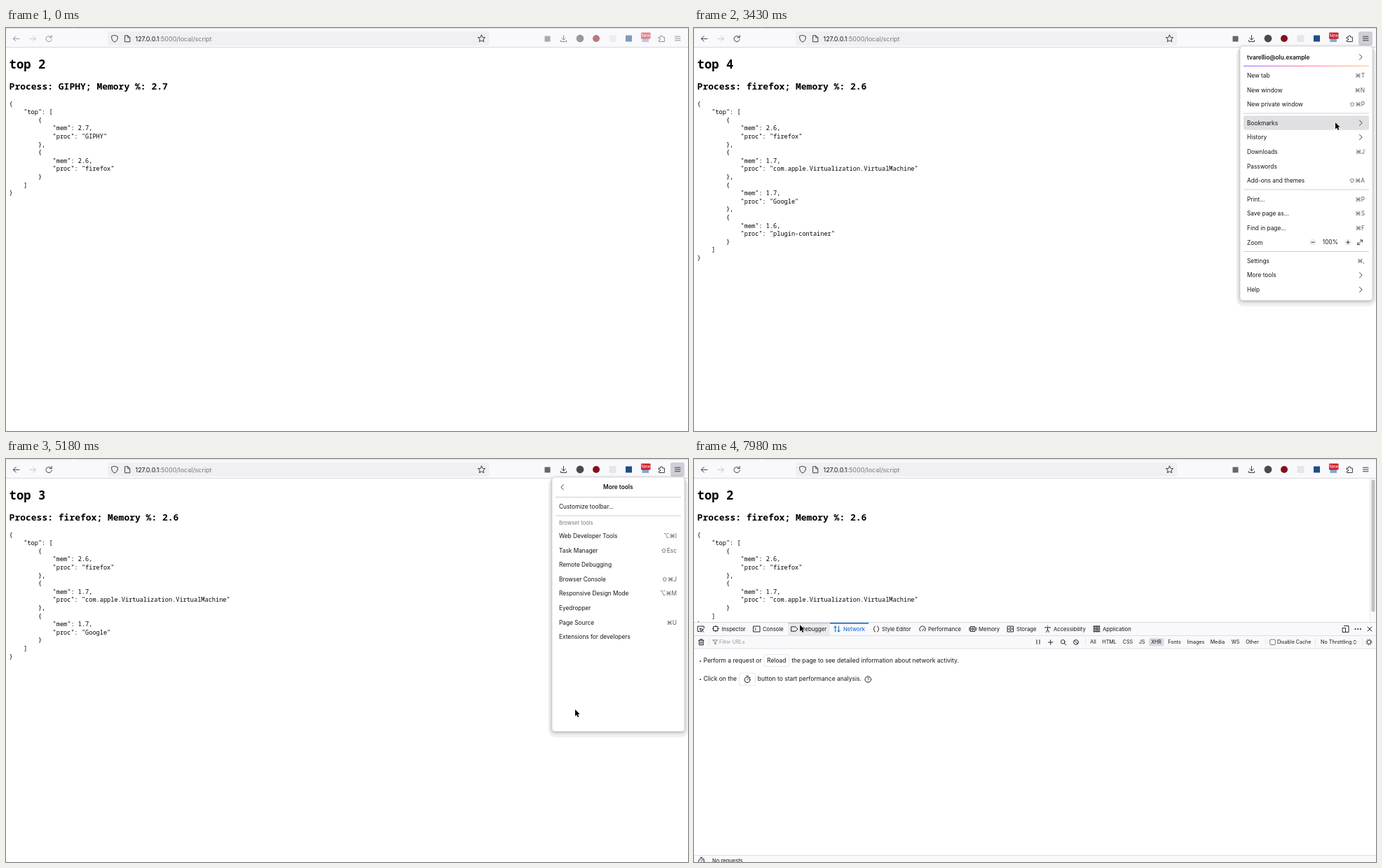
An HTML page that plays this animation: 973 by 576 pixels, repeating every 8000 ms.

```html
<!DOCTYPE html>
<html lang="en">
<head>
<meta charset="utf-8">
<title>Process memory page</title>
<style>
html, body { margin: 0; width: 100%; height: 100%; overflow: hidden; background: #fff; }
svg { display: block; width: 973px; height: 576px; }
text { font-family: Inter, "DejaVu Sans", sans-serif; fill: #15141a; white-space: pre; }
.mono text { font-family: "Roboto Mono", "Noto Sans Mono", "DejaVu Sans Mono", monospace; fill: #000; }
.bold { font-weight: 600; }
.key { fill: #5b5b66; }
.line { fill: none; stroke: #3a3942; stroke-width: 1; stroke-linecap: round; stroke-linejoin: round; }
.soft { stroke: #c4c4ca; }
.blue { stroke: #0060df; }
#devtools .line:not(.blue) { stroke: #25242c; }
</style>
</head>
<body>
<svg id="stage" viewBox="0 0 973 576" xmlns="http://www.w3.org/2000/svg"></svg>
<script>
const LOOP = 8000, TICK = 70;
const MENU = { x: 779, y: 26, w: 189, h: 363.5 };
const ROW = 20.6;
const BAR = '#f9f9fb';

// Drawing helpers
const text = (x, y, s, size = 8.3, attrs = '') =>
  `<text x="${x}" y="${y}" font-size="${size}" ${attrs}>${s}</text>`;
const rect = (x, y, w, h, fill, attrs = '') =>
  `<rect x="${x}" y="${y}" width="${w}" height="${h}" fill="${fill}" ${attrs}/>`;
const path = (d, cls = '', attrs = '') => `<path class="line ${cls}" d="${d}" ${attrs}/>`;
const dot = (x, y, r, fill) => `<circle cx="${x}" cy="${y}" r="${r}" fill="${fill}"/>`;
const ring = (x, y, r, attrs = '') => `<circle class="line" cx="${x}" cy="${y}" r="${r}" ${attrs}/>`;
const group = (id, body, attrs = '') => `<g id="${id}" ${attrs}>${body}</g>`;
const END = 'text-anchor="end"', MID = 'text-anchor="middle"';

const chevron = (x, y, dir = 1) =>
  path(`M${x - 2 * dir} ${y - 3.6}l${3.7 * dir} 3.6l${-3.7 * dir} 3.6`, '', 'stroke-width=".8"');
const rule = y => rect(784, y - .5, 179, 1, '#cfcfd3');
const stopwatch = (x, y) => ring(x, y + .6, 3.9) +
  path(`M${x - 1.2} ${y - 5}h2.4M${x} ${y + .6}l1.6-1.7M${x + 3} ${y - 3.4}l1 1`);

function toolbar() {
  const base = rect(0, 0, 973, 28, BAR) + rect(0, 0, 973, 1, '#dedee2') +
    rect(95, 0, 2, 1, '#fff') + rect(0, 27, 973, 1, '#d9d9dd') +
    rect(145, 5, 544, 20, '#f0f0f4', 'rx="3"');
  const address =
    path('M155 10.4l4.4 1.6c.2 4-1.2 6.6-4.4 8.2c-3.2-1.6-4.6-4.2-4.4-8.2Z') +
    path('M170 10.8h4l2.8 2.8v6.2h-6.8ZM173.8 11v2.8h2.8') +
    path('M678.5 10l1.5 3.3l3.6.4l-2.7 2.4l.8 3.6l-3.2-1.8l-3.2 1.8l.8-3.6l-2.7-2.4l3.6-.4Z', '', 'stroke-width=".9"') +
    text(184.5, 18.5, '127.0.0.1<tspan fill="#77767e">:5000/local/script</tspan>', 8.95);
  const nav =
    path('M19 15.3h-8.5M14.2 11.5l-3.8 3.8l3.8 3.8') +
    path('M64.4 13a4.1 4.1 0 1 0 .8 3.3M65.2 10.5v3.2h-3.2');
  const tools =
    rect(768.5, 11.5, 8, 8, '#67666f') +
    path('M795.5 10.5v6.3M792.6 14.2l2.9 2.8l2.9-2.8M791.5 17.5v2h8v-2') +
    dot(819, 15, 5.4, '#4a4952') +
    dot(842, 15, 5, '#85101b') +
    rect(860.5, 10, 10, 10, '#e6e6e9') +
    rect(884, 10.5, 9, 9, '#1d4f86') +
    rect(907.5, 12, 9.5, 8, '#7fa9d2') +
    rect(906, 6.5, 13.5, 9, '#d01c28', 'rx="1"') +
    text(912.8, 13.3, 'New', 6, `${MID} style="fill:#fff"`) +
    path('M931.5 13h2.3v-.9a1.4 1.4 0 0 1 2.8 0v.9h2.8v6.5h-7.9v-2.2h1a1.2 1.2 0 0 0 0-2.4h-1Z') +
    path('M954.5 12.2h7.5M954.5 15h7.5M954.5 17.8h7.5');
  return base + address + rect(948, 5, 20, 20, '#cfcfd8', 'id="burger" rx="3"') +
    path('M33.8 15.3h8.5M38.6 11.5l3.8 3.8l-3.8 3.8', 'soft') +
    group('chrome', nav + tools);
}

// Menu rows: centre y, label, shortcut (">" marks a submenu)
const mainRows = [
  [68, 'New tab', '⌘T'], [88.7, 'New window', '⌘N'], [109.3, 'New private window', '⇧⌘P'],
  [135.5, 'Bookmarks', '>'], [156, 'History', '>'], [176.8, 'Downloads', '⌘J'],
  [197.5, 'Passwords', ''], [218, 'Add-ons and themes', '⇧⌘A'],
  [244.5, 'Print...', '⌘P'], [265.2, 'Save page as...', '⌘S'], [285.8, 'Find in page...', '⌘F'],
  [332.8, 'Settings', '⌘,'], [353.3, 'More tools', '>'], [374, 'Help', '>']
];
const subRows = [
  [68, 'Customize toolbar...', ''], ...[
    ['Web Developer Tools', '⌥⌘I'], ['Task Manager', '⇧Esc'], ['Remote Debugging', ''],
    ['Browser Console', '⇧⌘J'], ['Responsive Design Mode', '⌥⌘M'], ['Eyedropper', ''],
    ['Page Source', '⌘U'], ['Extensions for developers', '']
  ].map(([label, key], i) => [110 + i * ROW, label, key])
];
const rowsMarkup = rows => rows.map(([y, label, key]) =>
  text(789, y + 3, label) +
  (key === '>' ? chevron(951.5, y) : text(957, y + 3, key, 8.3, `${END} class="key"`))).join('');
const hoverBar = id => rect(784, 0, 179, ROW, '#e0e0e2', `id="${id}" rx="2"`);

function menu() {
  const { x, y, w, h } = MENU;
  const main = hoverBar('mainHover') +
    text(789, 44.5, 'tvarellio@olu.example', 8.3, 'class="bold"') + chevron(951.5, 41.5) +
    rect(784, 53.8, 179, 1, 'url(#rainbow)') + [122, 231, 319.5].map(rule).join('') +
    rowsMarkup(mainRows) + text(789, 309.5, 'Zoom') +
    dot(883, 306.3, 5, '#f0f0f4') + dot(933, 306.3, 5, '#f0f0f4') +
    path('M880.8 306.3h4.4M930.8 306.3h4.4M933 304.1v4.4') +
    text(907.8, 309.4, '100%', 8.3, MID) +
    path('M947 309.4l6.2-6.2M950.4 303h3v3M949.8 309.6h-3v-3');
  const sub = hoverBar('subHover') + chevron(793.5, 40.3, -1) +
    text(873.3, 43.3, 'More tools', 8.3, `${MID} class="bold"`) + rule(54.5) + rule(81) +
    text(789, 93.7, 'Browser tools', 7.5, 'style="fill:#77767e"') + rowsMarkup(subRows);
  return rect(774, 28, 199, 370, '#000', 'rx="10" opacity=".055"') +
    rect(x, y, w, h, '#fff', 'rx="4" stroke="#c9c9ce" stroke-width=".6" style="filter:drop-shadow(0 1px 2px rgba(0,0,0,.3))"') +
    `<g clip-path="url(#panel)">${group('main', main)}${group('sub', sub)}</g>`;
}

const page = group('page',
  text(4.6, 58, '', 17.24, 'id="title" font-weight="700"') +
  text(4.6, 88.4, '', 13, 'id="lead" font-weight="700"') +
  group('json', ''), 'class="mono"');

// Developer tool tabs: label x, label, icon path
const tabs = [
  [39.5, 'Inspector', 'M28 239.5h6v6h-6ZM31 238v1.5M31 245.5v1.5M26.5 242.5h1.5M34 242.5h1.5'],
  [98, 'Console', 'M85 239h9v8h-9ZM87 241.5l1.6 1.5l-1.6 1.5'],
  [153, 'Debugger', 'M139 239.8h6l3 3.2l-3 3.2h-6Z'],
  [213, 'Network', 'M201.5 247v-8M199.5 241l2-2l2 2M206.5 239v8M204.5 245l2 2l2-2'],
  [268, 'Style Editor', 'M258.5 239c-2 0-1 3.5-2.5 4c1.5.5.5 4 2.5 4M261.5 239c2 0 1 3.5 2.5 4c-1.5.5-.5 4-2.5 4'],
  [334, 'Performance', 'M322.8 246a4.3 4.3 0 1 1 6.5 0M326 245.5l1.8-3'],
  [406, 'Memory', 'M394.7 239.5h6v7h-6ZM396.7 241.5h2v3h-2ZM393 241v4M402.4 241v4'],
  [460, 'Storage', 'M447.5 239h8v8h-8ZM447.5 243h8M450.5 241h2M450.5 245h2'],
  [513, 'Accessibility', 'M500.5 240.8h8M504.5 241v3l-2 3.5M504.5 244l2 3.5M504.5 238.4v.3'],
  [583, 'Application', '']
];
const filters = [[569.5, 'All'], [592.5, 'HTML'], [619, 'CSS'], [639, 'JS'], [659.5, 'XHR'],
  [685.5, 'Fonts'], [716, 'Images'], [747, 'Media'], [772.5, 'WS'], [796.5, 'Other']];

function devtools() {
  const grid = [0, 1, 2].flatMap(i => [0, 1, 2].map(j =>
    `<rect class="line" x="${570.5 + i * 3.3}" y="${238.7 + j * 3.3}" width="1.7" height="1.7" stroke-width=".7"/>`)).join('');
  const tabBar = rect(0, 233, 973, 1, '#d9d9dd') + rect(0, 234, 973, 37, BAR) +
    rect(0, 252, 973, 1, '#dfdfe3') + rect(0, 270.5, 973, 1, '#dfdfe3') +
    group('tabHover', rect(134, 234, 59.5, 18, '#ebebee') + rect(134, 234, 59.5, 1.3, '#c6c6cb')) +
    rect(194, 234, 55, 1.5, '#0060df') +
    path('M8 246.5h-2.8v-7.5h9v3M8.5 242l5 1.8l-2.2 1l-1 2.2ZM11.5 245l2.3 2.3') +
    tabs.map(([x, label, d]) => path(d, label === 'Network' ? 'blue' : '') +
      text(x, 245.6, label, 7.7, label === 'Network' ? 'style="fill:#0060df"' : '')).join('') + grid +
    path('M927.5 238.5h6.5v9h-3.5M925.5 241.5h4v6h-4Z') +
    [943.5, 947.2, 950.9].map(x => dot(x, 243, 1.1, '#2b2a33')).join('') +
    path('M961 240l6 6M967 240l-6 6');
  const divider = x => rect(x, 256, .8, 11, '#e0e0e4');
  const filterBar = [21, 558, 815, 886, 953].map(divider).join('') +
    path('M6.5 259.2h7.5M8.8 259v-1.3h3v1.3M7.3 259.5v6.3h6v-6.3M9.3 261.3v2.7M11.3 261.3v2.7') +
    path('M27 258.8h6.5l-2.5 3v3.2l-1.5-1v-2.2Z', '', 'style="stroke:#85848c" stroke-width=".8"') +
    text(36, 264.3, 'Filter URLs', 7.1, 'style="fill:#96959d"') +
    path('M489 258.5v6M493 258.5v6M505.5 262h6.5M508.7 258.7v6.5M528.3 263.3l2.5 2.5M542.7 259.5l4.7 4.7') +
    ring(526.3, 261.2, 2.8) + ring(545, 261.9, 3.4) +
    rect(649, 256, 21.5, 11.5, '#dddde1', 'rx="1.5"') +
    filters.map(([x, s]) => text(x, 264.3, s, 7.1, MID)).join('') +
    rect(821.8, 258, 7.5, 7.5, '#fff', 'stroke="#55545c" stroke-width=".8" rx="1"') +
    text(832, 264.3, 'Disable Cache', 7.1) + text(894, 264, 'No Throttling', 7.2) +
    path('M941 260.8l1.7-1.8l1.7 1.8M941 262.8l1.7 1.8l1.7-1.8', '', 'stroke-width=".8"') +
    ring(963, 261.7, 2.8, 'stroke-width="1.3"') +
    ring(963, 261.7, 4.2, 'stroke-dasharray="1.2 2.1" stroke-width="1.5" style="stroke-linecap:butt"');
  const button = (x, y, w, h) => rect(x, y, w, h, '#fff', 'stroke="#e1e1e5" stroke-width=".8" rx="1"');
  const body = dot(9, 289, 1, '#2b2a33') + text(13.5, 291.2, 'Perform a request or', 8.5) +
    button(100, 279.5, 35.5, 17) + text(117.8, 291.2, 'Reload', 8.5, MID) +
    text(139.2, 291.2, 'the page to see detailed information about network activity.', 8.5) +
    dot(9, 315, 1, '#2b2a33') + text(13.5, 317.2, 'Click on the', 8.5) +
    button(64.5, 306, 23, 17.5) + stopwatch(76, 315) +
    text(90.8, 317.2, 'button to start performance analysis.', 8.5) +
    ring(248.3, 315, 4.3, 'stroke-width=".8"') + text(248.3, 317.7, '?', 7, MID) +
    rect(0, 566, 973, 10, BAR) + rect(0, 566, 973, 1, '#dfdfe3') +
    stopwatch(10.5, 574.5) + text(26, 577, 'No requests', 7.6);
  const scrollbar = rect(964, 28, 9, 205, '#fafafa') + rect(964, 28, .8, 205, '#e3e3e3') +
    rect(966.5, 29.5, 5, 189, '#c1c1c3', 'rx="2.5"');
  return scrollbar + rect(0, 233, 973, 343, '#fff') + tabBar + filterBar + body;
}

const stage = document.getElementById('stage');
stage.innerHTML = `<defs>
  <linearGradient id="rainbow"><stop stop-color="#9059ff"/><stop offset=".5" stop-color="#ff6aa8"/><stop offset="1" stop-color="#ffc266"/></linearGradient>
  <clipPath id="panel">${rect(MENU.x, MENU.y, MENU.w, MENU.h, '#000', 'rx="4"')}</clipPath></defs>` +
  rect(0, 0, 973, 576, '#fff') + page + toolbar() +
  group('devtools', devtools()) + group('menu', menu()) +
  group('cursor', '<path d="M0 0V9.4L2.2 7.4L3.7 10.9L5.3 10.2L3.8 6.8H6.7Z" fill="#000" stroke="#fff" stroke-width="1.2" paint-order="stroke" stroke-linejoin="round"/>');

const $ = id => document.getElementById(id);
const show = (id, on) => $(id).setAttribute('display', on ? 'inline' : 'none');
const move = (id, x, y = 0) => $(id).setAttribute('transform', `translate(${x} ${y})`);

// Page contents over time
const busy = [[2.6, 'firefox'], [1.7, 'com.apple.Virtualization.VirtualMachine'], [1.7, 'Google'], [1.6, 'plugin-container']];
const reports = [
  [0, [[2.7, 'GIPHY'], [2.6, 'firefox']]],
  [1750, busy], [3850, busy.slice(0, 3)], [5950, busy.slice(0, 2)]
];
let shown;
function fillPage(list) {
  if (list === shown) return;
  shown = list;
  const [mem, proc] = list[0];
  $('title').textContent = `top ${list.length}`;
  $('lead').textContent = `Process: ${proc}; Memory %: ${mem}`;
  const json = JSON.stringify({ top: list.map(([mem, proc]) => ({ mem, proc })) }, null, 4);
  $('json').innerHTML = json.split('\n').map((s, i) => text(4.6, 111.6 + i * 11.6, s, 8.62)).join('');
}

// Pointer path: time, x, y
const route = [
  [840, 583, 543], [980, 612, 500], [1190, 745, 310], [1400, 902, 92], [1540, 958, 18], [1610, 966, 11],
  [1890, 963, 12], [3150, 963, 12], [3290, 950, 55], [3430, 915, 135], [3570, 877, 205], [3780, 847, 254],
  [3990, 829, 303], [4130, 822, 335], [4270, 817, 366], [4410, 815, 371], [4690, 812, 358],
  [5460, 812, 358], [5740, 820, 290], [6020, 833, 185], [6300, 840, 128], [6440, 839, 121], [6650, 838, 115],
  [7560, 838, 115], [7630, 810, 97], [7700, 700, 80], [7770, 480, 96], [7840, 290, 160], [7910, 178, 220], [7980, 151, 237]
];
function pointer(t) {
  const i = route.findIndex(p => p[0] > t);
  if (i < 0) return route[route.length - 1].slice(1);
  if (i === 0) return [-50, -50];
  const [a, b] = [route[i - 1], route[i]], k = (t - a[0]) / (b[0] - a[0]);
  return [a[1] + (b[1] - a[1]) * k, a[2] + (b[2] - a[2]) * k];
}

function hover(id, rows, x, y, on) {
  const row = on && x > 784 && x < 963 && rows.find(r => Math.abs(r[0] - y) <= ROW / 2);
  show(id, row);
  if (row) $(id).setAttribute('y', row[0] - ROW / 2);
}

function render(now) {
  const t = Math.floor(now % LOOP / TICK) * TICK;
  const [x, y] = pointer(t);
  const open = t >= 2590 && t < 6860;
  const slide = 1 - (1 - Math.min(1, Math.max(0, (t - 4760) / 420))) ** 3;

  fillPage(reports.findLast(r => r[0] <= t)[1]);
  $('chrome').setAttribute('opacity', t < 2520 ? .55 : 1);
  show('burger', t >= 1610 && t < 6860);
  $('burger').setAttribute('fill', open ? '#cfcfd8' : '#e3e3e8');

  show('menu', open);
  move('main', -MENU.w * slide);
  move('sub', MENU.w * (1 - slide));
  show('sub', slide > 0);
  hover('mainHover', mainRows, x, y, slide < 1);
  hover('subHover', subRows, x, y, slide === 1);

  show('devtools', t >= 6930);
  show('tabHover', x > 134 && x < 193 && y > 234);
  move('cursor', x, y);
}

const start = performance.now();
function loop() {
  render(performance.now() - start);
  requestAnimationFrame(loop);
}
loop();
</script>
</body>
</html>
```
